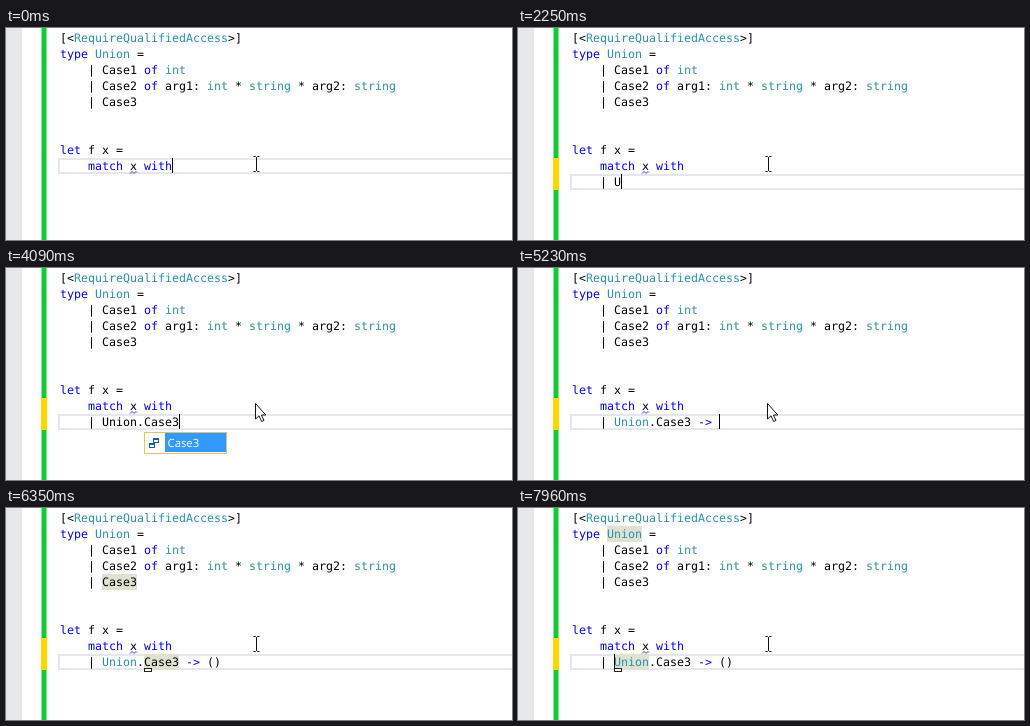
These frames come from a looping animation (506 px wide and 212 px high, 8000 ms). An HTML page:

```html
<!DOCTYPE html>
<html lang="en">
<head>
<meta charset="utf-8">
<title>Editor completion</title>
<style>
  html, body { margin: 0; width: 100%; height: 100%; overflow: hidden; background: #fff; }
  svg { display: block; width: 506px; height: 212px; }
  .code { font: 11.63px "DejaVu Sans Mono", "Liberation Mono", monospace; text-rendering: geometricPrecision; white-space: pre; }
  .item { font: 11.3px "Open Sans", "Noto Sans", sans-serif; text-rendering: geometricPrecision; }
</style>
</head>
<body>
<svg id="stage" viewBox="0 0 506 212"></svg>
<script>
const LOOP = 8000, LEFT = 54, CHAR = 7, ROW = 16;
const BLUE = '#0000ff', TEAL = '#2b91af', MARK = '#dfe2d1', GOLD = '#e5c365';
const KEYWORDS = /^(type|of|let|match|with|->)$/;
const TYPES = /^(RequireQualifiedAccess|Union|int|string)$/;
const SOURCE = [
  '[<RequireQualifiedAccess>]',
  'type Union =',
  '    | Case1 of int',
  '    | Case2 of arg1: int * string * arg2: string',
  '    | Case3',
  '', '',
  'let f x =',
  '    match x with'
];

// Each step overrides part of the state before it; caret is a column, -1 hides it.
const STEPS = [
  [0, { row: 8, text: '', caret: 16, mouse: 'beam', mark: '', list: '', plain: true, tag: -1, error: false }],
  [590, { caret: -1 }],
  [1150, { row: 9, caret: 4 }],
  [1580, { text: '|', caret: -1 }],
  [1860, { caret: 5 }],
  [1980, { text: '| ', caret: 6 }],
  [2130, { text: '| U', caret: -1 }],
  [2250, { caret: 7 }],
  [2500, { text: '| Un', caret: 8 }],
  [2650, { text: '| Uni', caret: 9 }],
  [2770, { text: '| Union', caret: 11, mouse: 'arrow' }],
  [3050, { text: '| Union.', caret: 12, mark: 'union', list: 'soft' }],
  [3170, { text: '| Union.C', caret: 13, list: 'full' }],
  [3450, { text: '| Union.Ca', caret: 14, mark: '' }],
  [3600, { text: '| Union.Cas', caret: 15 }],
  [3720, { text: '| Union.Case', caret: 16 }],
  [4090, { text: '| Union.Case3', caret: 17, list: 'single' }],
  [4650, { caret: 18, list: '' }],
  [4810, { text: '| Union.Case3 -', caret: -1 }],
  [4930, { caret: 19 }],
  [5080, { text: '| Union.Case3 ->', caret: 20 }],
  [5230, { caret: 21, plain: false }],
  [5360, { text: '| Union.Case3 -> (', caret: 22, error: true }],
  [5500, { text: '| Union.Case3 -> ()', caret: 23, error: false }],
  [5660, { mouse: 'beam' }],
  [5810, { caret: 22 }],
  [5930, { caret: 21, mark: 'parens' }],
  [6080, { caret: 18, mark: '' }],
  [6200, { caret: 12 }],
  [6350, { caret: -1, mark: 'case', tag: 12 }],
  [6630, { mouse: 'arrow' }],
  [6910, { caret: 11, mouse: 'beam', tag: -1 }],
  [7030, { caret: 6, mark: '' }],
  [7150, { mark: 'union', tag: 6 }],
  [7400, { caret: -1 }],
  [7960, { caret: 6 }]
];
let last = {};
const states = STEPS.map(([time, change]) => ({ time, state: last = { ...last, ...change } }));

// Highlighted spans as row, column, length.
const MARKS = {
  union: [[1, 5, 5], [9, 6, 5]],
  case: [[4, 6, 5], [9, 12, 5]],
  parens: [[9, 21, 1], [9, 22, 1]]
};

const colX = col => LEFT + CHAR * col;
const rowY = row => 2 + ROW * row;
const rect = (x, y, w, h, fill, extra = '') =>
  `<rect x="${x}" y="${y}" width="${w}" height="${h}" fill="${fill}" ${extra}/>`;
const path = (d, stroke, fill = 'none') => `<path d="${d}" stroke="${stroke}" fill="${fill}"/>`;
const escape = s => s.replace(/&/g, '&amp;').replace(/</g, '&lt;').replace(/>/g, '&gt;');

function codeLine(text, row, plain = false) {
  return [...text.matchAll(/->|\w+|[^\w\s]+/g)].map(({ 0: word, index }) => {
    const fill = KEYWORDS.test(word) ? BLUE : TYPES.test(word) && !plain ? TEAL : '#000';
    return `<text class="code" x="${colX(index)}" y="${rowY(row) + 12}" fill="${fill}">${escape(word)}</text>`;
  }).join('');
}

function caseIcon(y) {
  return rect(147.5, y + 5.5, 5, 4, '#fff', 'stroke="#1c5f9e"') + rect(147, y + 5, 6, 2, '#1c5f9e') +
    rect(143.5, y + 10.5, 5, 4, '#fff', 'stroke="#1c5f9e"') + rect(143, y + 10, 6, 2, '#1c5f9e');
}

function completion(mode) {
  if (!mode) return '';
  const names = mode === 'single' ? ['Case3'] : ['Case1', 'Case2', 'Case3'];
  const height = names.length * 19 + 2;
  let out = rect(138.5, 164.5, 82, height, '#fff', `stroke="${GOLD}"`);
  names.forEach((name, i) => {
    const y = 165 + 19 * i, full = i === 0 && mode !== 'soft';
    if (full) out += rect(159, y, 61, 19, '#3399ff');
    else if (i === 0) out += rect(159.5, y + .5, 60, 18, '#fff', 'stroke="#d3a344"');
    out += caseIcon(y) +
      `<text class="item" x="161.5" y="${y + 14}" fill="${full ? '#fff' : '#1e1e1e'}">${name}</text>`;
  });
  return out;
}

const POINTERS = {
  beam: path('M247.5 128.5H249.5L250.5 129.5L251.5 128.5H253.5M250.5 129V143M247.5 143.5H249.5L250.5 142.5L251.5 143.5H253.5', '#111'),
  arrow: path('M249.5 135.5V151L253 147.8L255.7 153.5L258 152.4L255.4 147H259.8Z', '#111', '#fff')
};

const squiggle = (col, y, color) => path(`M${colX(col)} ${y}l2 -2l2 2l2 -2l1 1`, color);

function draw(s) {
  const y = rowY(s.row);
  let out = rect(0, 0, 506, 212, '#fff') + rect(0, 0, 16, 212, '#e6e7e8') + rect(35.5, 0, 5, 212, '#10c832');
  if (s.row === 9) out += rect(35, 130, 6, 32, '#ffd800');
  out += rect(53, y + 1, 470, 14, 'none', 'stroke="#e6e6f1" stroke-width="2"');
  for (const [row, col, len] of MARKS[s.mark] || []) {
    out += rect(colX(col), rowY(row), len * CHAR, ROW, MARK);
  }
  out += SOURCE.map((line, row) => codeLine(line, row)).join('');
  out += codeLine('    ' + s.text, 9, s.plain);
  out += squiggle(10, 145.5, '#3a3af0');
  if (s.error) out += squiggle(22, 162, '#f00');
  if (s.tag >= 0) out += rect(colX(s.tag) + .5, 160.5, 7, 3, '#fff', 'stroke="#222"');
  if (s.caret >= 0) out += rect(colX(s.caret), y, 1, 15, '#000');
  return out + completion(s.list) + POINTERS[s.mouse];
}

const stage = document.getElementById('stage');
const start = performance.now();
let shown;
function tick() {
  const t = (performance.now() - start) % LOOP;
  const { state } = states.findLast(step => step.time <= t);
  if (state !== shown) stage.innerHTML = draw(shown = state);
  requestAnimationFrame(tick);
}
tick();
</script>
</body>
</html>
```
